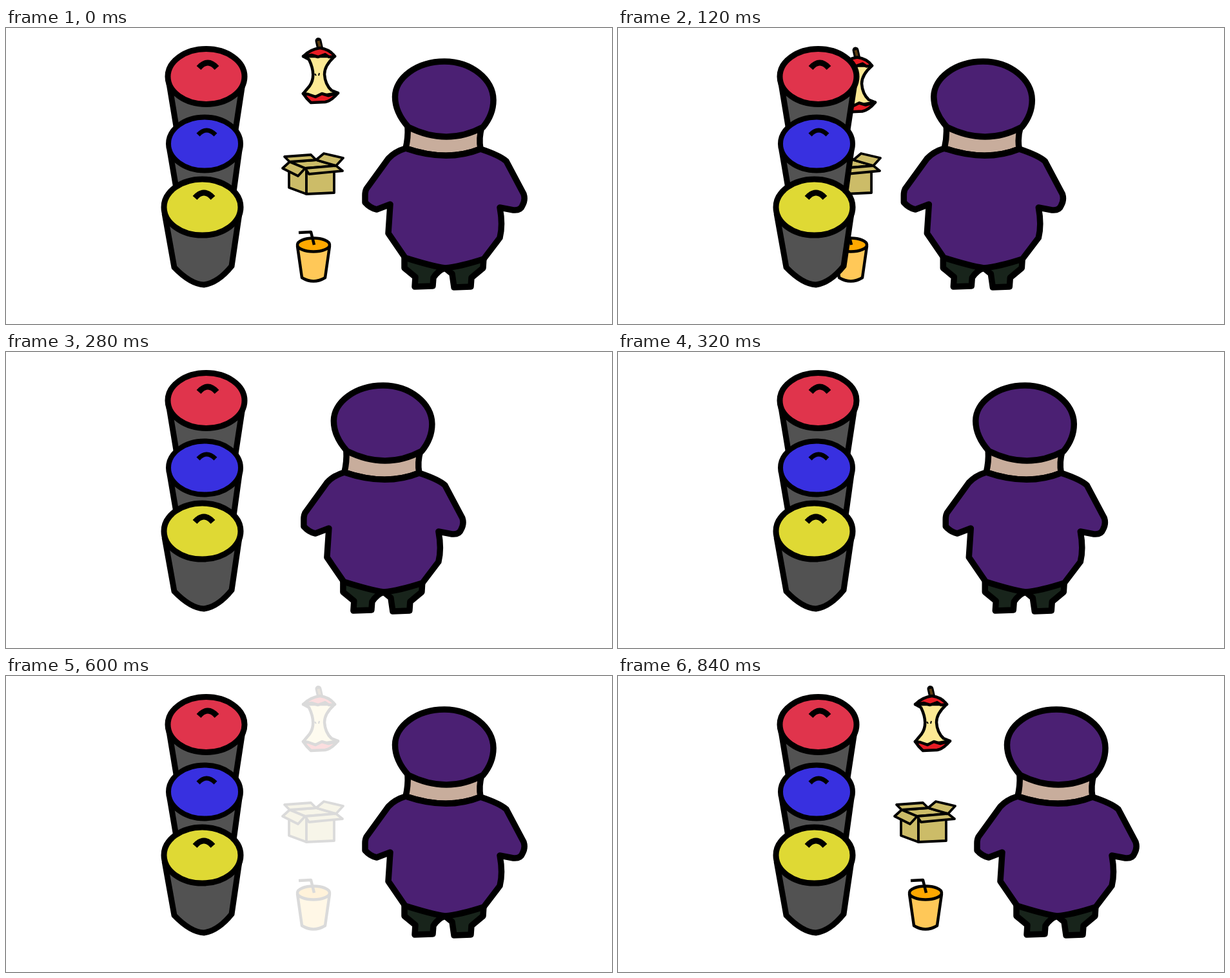
Recreate the animation shown at these times as an HTML page. Size 940 px wide and 460 px high, loop 1 s.

```html
<!DOCTYPE html>
<html lang="en">
<head>
<meta charset="utf-8">
<title>Sorting waste</title>
<style>
  html, body { margin: 0; width: 100%; height: 100%; overflow: hidden; background: #fff; }
  svg { display: block; width: 100vw; height: 100vh; }
</style>
</head>
<body>
<svg viewBox="0 0 940 460" stroke="#000" stroke-linejoin="round" fill="none">
  <g id="items" stroke-width="4.5">
    <g id="apple">
      <path d="M484.5 20L487 31" stroke-width="10" stroke-linecap="round"/>
      <path d="M484.5 20L487 30" stroke="#5c3c10" stroke-width="4"/>
      <path fill="#fce994" d="M461 44L470 49Q482 74 471 90L461 102L480 107L515 101L505 97Q495 88 494 72Q494 58 510 44Z"/>
      <path fill="#e81c24" d="M461 44Q472 33 487 31Q502 33 510 44L501 45L495 41L484 45L474 42Z"/>
      <path fill="#e81c24" d="M461 102L469 103L480 107L490 102L500 105L515 101Q505 113 495 115L473 116Q466 110 461 102Z"/>
      <path d="M479 71L481 74M486 70L485 74" stroke-width="2"/>
    </g>
    <g id="box" fill="#ccbc68" stroke-width="3.8">
      <path d="M439 212V248L466 258V219Z"/>
      <path d="M466 219V258L509 256V218Z"/>
      <path d="M440 208L481 205L512 214L464 218Z"/>
      <path d="M440 208L432 200L473 197L481 205Z"/>
      <path d="M481 205L493 195L523 202L512 214Z"/>
      <path d="M464 218L470 227L522 222L512 214Z"/>
      <path d="M440 208L429 218L453 230L464 218Z"/>
    </g>
    <g id="cup">
      <path fill="#ffc858" d="M452 339L459 388Q477 399 495 388L502 339Z"/>
      <ellipse cx="477" cy="337" rx="25" ry="10.5" fill="#ffa800"/>
      <path d="M454 318L473 317L478 337"/>
    </g>
  </g>

  <g fill="#525252" stroke-width="9">
    <path d="M253 86L266 165H355L367 86"/>
    <ellipse cx="310.5" cy="75.5" rx="59.5" ry="43" fill="#e0344c"/>
    <path d="M299 62Q313 46 327 62" fill="none"/>
    <path d="M254 190L265 255H353L362 190"/>
    <ellipse cx="308" cy="180" rx="56" ry="41.5" fill="#3830e0" stroke-width="8"/>
    <path d="M298 166Q311 152 325 166" fill="none" stroke-width="7"/>
    <path d="M246 288L261 372Q286 398 307 399Q329 396 350 370L362 288"/>
    <ellipse cx="304.5" cy="278.5" rx="59.5" ry="43.5" fill="#dfd934"/>
    <path d="M293 264Q307 248 321 264" fill="none"/>
  </g>

  <g id="person" stroke-width="9.5">
    <g fill="#18241b">
      <path d="M618 356V373L635 387L634 402L662 401L663 388Q670 377 681 373Z"/>
      <path d="M681 373L692 382L695 403L721 402L722 388L740 373L741 357Z"/>
    </g>
    <path fill="#c8ad9c" d="M623 154Q624 170 620 187Q684 209 736 188Q733 171 738 154Z"/>
    <g fill="#4b2073">
      <path d="M620 187Q603 192 593 203L559 250Q557 254 557 260V271Q565 280 575 282L596 274L593 319L619 357Q660 370 681 373Q704 371 741 359L766 326Q771 306 766 279L787 283Q798 284 801 276Q806 267 803 258L776 207Q766 198 736 188Q684 209 620 187Z"/>
      <path d="M603.5 107C603.5 78 637 52 680 52C722 52 756 80 756 112C756 130 749 143 740 154Q684 184 624 154Q603.5 131 603.5 107Z"/>
    </g>
  </g>

  <path id="lines" d="M495 154L570 149M527 255L570 251.5" stroke="#fff" stroke-width="8" stroke-linecap="round"/>
</svg>
<script>
  const $ = id => document.getElementById(id);
  const clamp = (v, lo, hi) => Math.min(hi, Math.max(lo, v));
  const move = (id, x, y = 0) => $(id).setAttribute('transform', `translate(${x} ${y})`);

  function draw(now) {
    const t = Math.floor(now % 1000 / 40) * 40;
    // run to the bins, pause briefly, run back
    const run = clamp(1.16 * Math.min(t - 22, 362 - t), 0, 188);
    const push = t < 200 ? run * 1.02 : 0;
    move('person', -run);
    move('apple', -push, push / 8);
    move('box', -push);
    move('cup', -push);
    $('items').setAttribute('opacity', t < 200 ? 1 : clamp((t - 560) / 280, 0, 1));
    $('lines').setAttribute('opacity', t === 200 ? 1 : 0);
    requestAnimationFrame(() => draw(performance.now()));
  }
  draw(performance.now());
</script>
</body>
</html>
```
